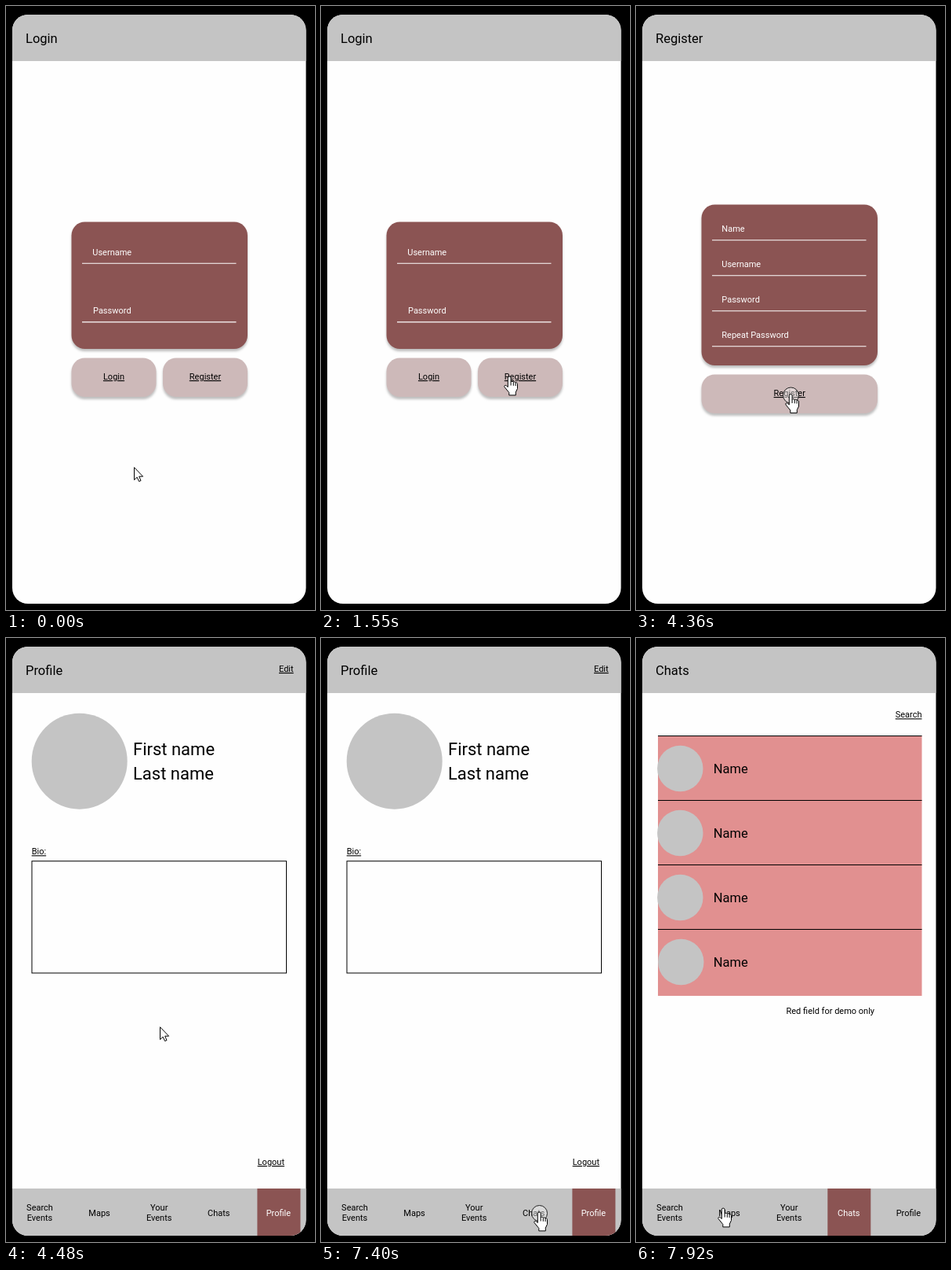
An HTML page for the animation above (8 s loop, 394x768 px).

```html
<!DOCTYPE html>
<html lang="en">
<head>
<meta charset="utf-8">
<title>App prototype</title>
<style>
  html, body { margin: 0; width: 100%; height: 100%; overflow: hidden; background: #000; }
  svg { display: block; width: 394px; height: 768px; }
  text { font: 11px Roboto, sans-serif; fill: #000; white-space: pre; }
  .title { font-size: 16.5px; }
  .big { font-size: 22px; }
  .link { text-decoration: underline; }
  .mid { text-anchor: middle; }
  .light { fill: #fff; }
  .grey { fill: #c4c4c4; }
  .wine { fill: #8b5453; }
  .pale { fill: #cdb9b9; }
  .raised { filter: drop-shadow(0 3px 1.5px rgba(0, 0, 0, .25)); }
  .cursor path { fill: #fff; stroke: #000; stroke-linejoin: round; }
</style>
</head>
<body>
<svg viewBox="0 0 394 768">
  <defs>
    <clipPath id="shell"><rect x="8" y="11" width="374.5" height="749" rx="20"/></clipPath>
  </defs>
  <g clip-path="url(#shell)">
    <rect x="8" y="11" width="375" height="749" fill="#fefefe"/>
    <rect class="grey" x="8" y="11" width="375" height="59"/>
    <g id="screens"></g>
  </g>
  <circle id="ring" r="10" fill="#fff" fill-opacity=".4" stroke="#222"/>
  <g id="arrow" class="cursor">
    <path d="M.5 .7V16.6L4.2 13.2L6.6 18.5L9 17.5L6.7 12.2H11.6Z"/>
  </g>
  <g id="hand" class="cursor">
    <path d="M5.3 14V2.4a1.9 1.9 0 0 1 3.8 0V7.6c.6-1.3 2.9-1.2 3.2.3c.7-1 2.5-.8 2.8.7c.9-.7 2.4-.2 2.4 1.4V16l-2.2 4.6V24.4H6.8V21L1.2 14.2c-1.2-1.9.8-3.2 2.2-1.9Z"/>
    <path d="M9.1 7.6V12M12.3 8V12.3M15.1 8.6V12.6" style="fill:none"/>
  </g>
</svg>
<script>
const $ = id => document.getElementById(id);

const text = (x, y, label, cls = '') => `<text x="${x}" y="${y}" class="${cls}">${label}</text>`;
const rect = (x, y, w, h, cls, r = 0) =>
  `<rect x="${x}" y="${y}" width="${w}" height="${h}" rx="${r}" class="${cls}"/>`;
const circle = (x, y, r) => `<circle cx="${x}" cy="${y}" r="${r}" class="grey"/>`;
const line = (x1, x2, y, color) =>
  `<path d="M${x1} ${y}H${x2}" stroke="${color}" stroke-width="1.1"/>`;

const title = label => text(25, 47, label, 'title');
const card = (y, h) => rect(83.5, y, 224.5, h, 'wine raised', 17);
const field = (x, y, label) =>
  text(x, y, label, 'light') + line(97, 293.5, y + 10.7, '#fff');
const button = (x, y, w, label) =>
  rect(x, y, w, 49.5, 'pale raised', 17) + text(x + w / 2, y + 27.5, label, 'mid link');

function nav(active) {
  const tabs = ['Search Events', 'Maps', 'Your Events', 'Chats', 'Profile'];
  return rect(8, 700, 375, 60, 'grey') + tabs.map((tab, i) => {
    const x = 43 + 76.1 * i;
    const on = tab === active;
    const words = tab.split(' ');
    const top = words.length > 1 ? 728 : 734.5;
    return (on ? rect(x - 27, 700, 55, 60, 'wine') : '') +
      words.map((word, n) => text(x, top + 13 * n, word, on ? 'mid light' : 'mid')).join('');
  }).join('');
}

const screens = {
  login: title('Login') + card(274.5, 161.5) +
    field(110.3, 316.5, 'Username') + field(111, 391.2, 'Password') +
    button(83.5, 447.5, 108, 'Login') + button(200, 447.5, 108, 'Register'),

  register: title('Register') + card(252.5, 204.5) +
    ['Name', 'Username', 'Password', 'Repeat Password']
      .map((label, i) => field(109.3, 287 + 45 * i, label)).join('') +
    button(83.5, 468.5, 224.5, 'Register'),

  profile: title('Profile') + text(348, 43, 'Edit', 'link') + circle(93.7, 156.7, 61) +
    text(162, 149, 'First name', 'big') + text(162, 180, 'Last name', 'big') +
    text(32.7, 275.3, 'Bio:', 'link') +
    '<rect x="33" y="283.7" width="324.5" height="142.3" fill="none" stroke="#000"/>' +
    text(320.7, 670, 'Logout', 'link') + nav('Profile'),

  chats: title('Chats') + text(330.7, 101.3, 'Search', 'link') +
    '<rect x="28" y="124" width="336.5" height="331" fill="#e19090"/>' +
    [0, 1, 2, 3].map(i => {
      const y = 124.5 + 82 * i;
      return line(28, 364.5, y, '#000') + circle(i < 3 ? 56.3 : 57.3, y + 41.5, 29.2) +
        text(98.7, y + 47.3, 'Name', 'title');
    }).join('') +
    text(191.5, 477.5, 'Red field for demo only') + nav('Chats'),
};

$('screens').innerHTML = Object.entries(screens)
  .map(([name, body]) => `<g id="${name}">${body}</g>`).join('');

const LOOP = 8000;
const scenes = [[0, 'login'], [2430, 'register'], [4480, 'profile'], [7550, 'chats']];
const clicks = [[4360, 4480], [7400, 7550]];

// start time, top left corner of the pointer, 1 for the hand
const pointer = [
  [0, 163, 586], [280, 140, 572], [400, 100, 542], [550, 277, 535], [710, 169, 329],
  [850, 114, 452, 1], [1000, 233, 472, 1], [1130, 180, 380], [1270, 130, 428],
  [1420, 224, 475, 1], [1550, 233, 470.5, 1], [3010, 235, 473, 1], [3130, 208, 483.5, 1],
  [3290, 192, 492, 1], [3430, 190, 493, 1], [4480, 196, 494], [5070, 213, 487],
  [5190, 229, 478], [5340, 189, 433], [5500, 153, 405], [5630, 156, 373],
  [5770, 173, 190], [5920, 97, 345], [6050, 195, 498], [6190, 222, 546],
  [6310, 253, 604], [6430, 283, 655], [6550, 297, 681], [6710, 293, 703],
  [6850, 276, 719, 1], [6970, 271, 728.5, 1], [7120, 271, 729.5, 1],
  [7550, 278, 731], [7670, 245, 730], [7800, 172, 727, 1], [7920, 104, 724.5, 1],
];

const current = (steps, t) => steps.findLast(step => step[0] <= t);
const show = (el, on) => el.setAttribute('visibility', on ? 'visible' : 'hidden');

function draw(t) {
  const scene = current(scenes, t)[1];
  for (const name in screens) $(name).style.display = name === scene ? '' : 'none';

  const [, x, y, isHand] = current(pointer, t);
  for (const id of ['arrow', 'hand']) {
    $(id).setAttribute('transform', `translate(${x} ${y})`);
    show($(id), (id === 'hand') === !!isHand);
  }
  $('ring').setAttribute('transform', `translate(${x + 7.5} ${y + 2})`);
  show($('ring'), clicks.some(([from, to]) => t >= from && t < to));
}

const start = performance.now();
function frame() {
  draw((performance.now() - start) % LOOP);
  requestAnimationFrame(frame);
}
frame();
</script>
</body>
</html>
```
